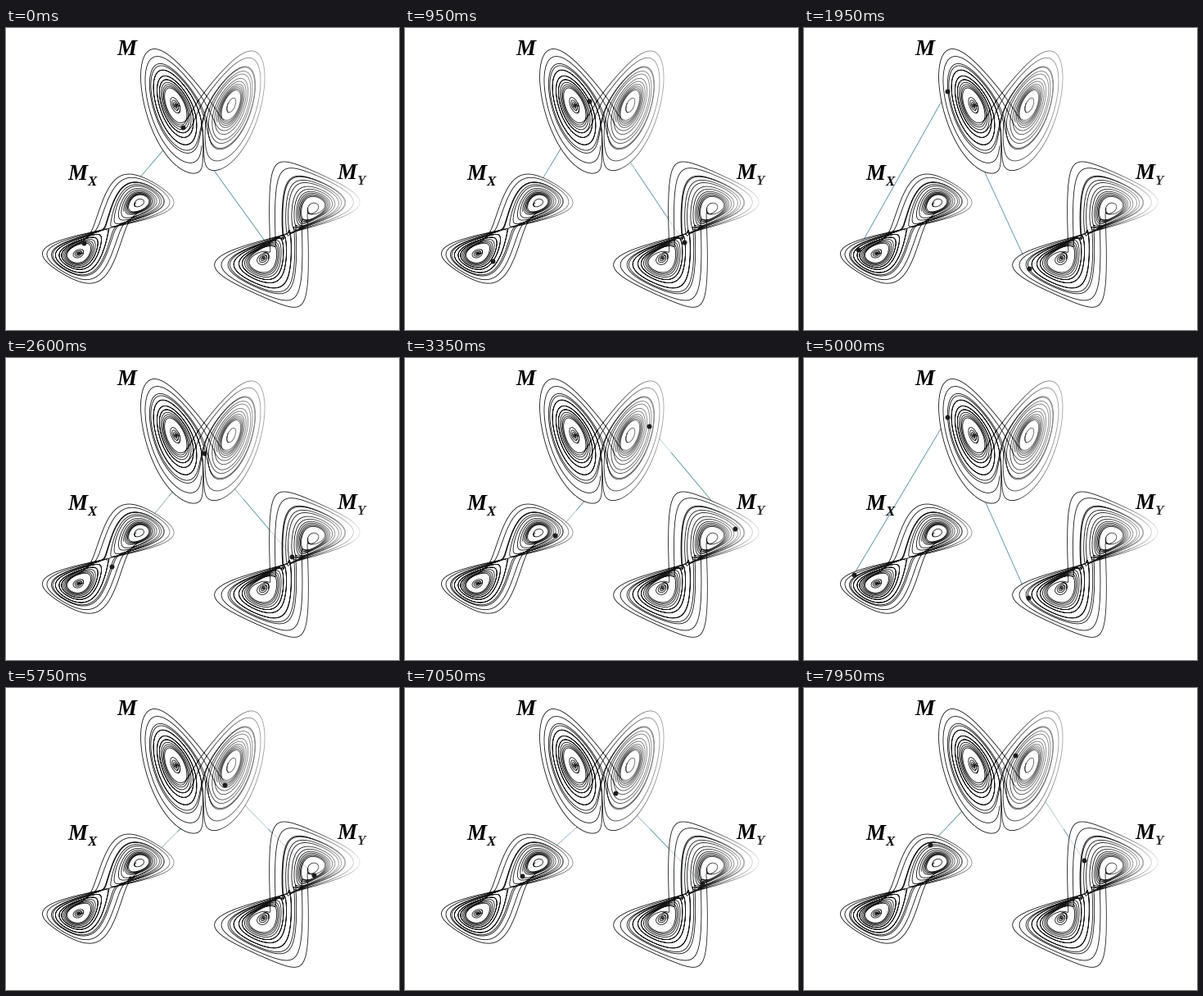
Animation, 480 px wide and 368 px high, one loop 8000 ms. Source, as a matplotlib script:

```python
import numpy as np
import matplotlib.pyplot as plt
from matplotlib.animation import FuncAnimation

W, H = 480, 368
FRAMES, STEP = 160, 50
DT, LAG = 0.0125, 10
C = np.sqrt(72)
PT = 0.72  # points per pixel at 100 dpi


def flow(s):
    x, y, z = s
    return np.stack([10 * (y - x), x * (28 - z) - y, x * y - z * 8 / 3])


def run(s, n):
    """Integrate the Lorenz system (RK4); result has shape (3, n, ...)."""
    out = []
    for _ in range(n):
        out.append(s)
        a = flow(s)
        b = flow(s + DT / 2 * a)
        c = flow(s + DT / 2 * b)
        d = flow(s + DT * c)
        s = s + DT / 6 * (a + 2 * b + 2 * c + d)
    return np.stack(out, 1)


def densify(s):
    """Insert Hermite midpoints to smooth the fast parts."""
    f = flow(s)
    out = np.empty((3, 2 * s.shape[1] - 1))
    out[:, ::2] = s
    out[:, 1::2] = (s[:, 1:] + s[:, :-1]) / 2 + DT / 8 * (f[:, :-1] - f[:, 1:])
    return out


def views(s, lag=LAG):
    """Pixel coordinates on M, M_X and M_Y: six rows."""
    x, y, z = s[:, lag:]
    px, py, _ = s[:, :-lag]
    return np.stack([
        241 + 4.05 * (x + 0.2 * (y - x)), 94 - 3.7 * (z - 27),
        125.5 + 4.4 * x, 244 - 3.65 * px,
        344.5 + 3.6 * y, 250.5 - 3.6 * py])


# an ensemble of orbits settled on the attractor
rng = np.random.default_rng(4)
seeds = rng.normal(0, 8, (3, 800))
seeds[2] += 25
orbits = run(run(seeds, 600)[:, -1], 1600)

# waypoints of the moving state: ms, then x, y on M, M_X, M_Y
KEYS = np.array([
    [0, 216, 121, 95, 262, 318, 262],
    [1950, 175, 77, 66, 270, 275, 293],
    [3350, 298, 83, 183, 216, 403, 208],
    [4300, 232, 140, 120, 244, 337, 255],
    [5750, 267, 118, 152, 232, 376, 228],
    [7050, 257, 128, 143, 229, 363, 238],
    [7950, 258, 82, 154, 191, 342, 210]])
key_frames = KEYS[:, 0] // STEP


def find_path():
    """Choose the orbit piece and speed that best follow the waypoints."""
    pos = views(orbits).astype(np.float32)
    starts = pos.shape[1] - 400
    best = (np.inf,)
    for rate in np.linspace(1.75, 2.35, 13):
        err = np.zeros((starts, pos.shape[2]), np.float32)
        for f, row in zip(key_frames, KEYS[:, 1:]):
            o = int(round(f * rate))
            for c in range(6):
                err += np.abs(pos[c, o:o + starts] - np.float32(row[c]))
        i, n = np.unravel_index(err.argmin(), err.shape)
        if err[i, n] < best[0]:
            best = (err[i, n], rate, i, n)
    _, rate, i, n = best
    t = i + np.arange(FRAMES) * rate
    grid = np.arange(pos.shape[1])
    path = np.array([np.interp(t, grid, p) for p in pos[:, :, n]])
    rest = KEYS[:, 1:].T - path[:, key_frames]
    return path + [np.interp(np.arange(FRAMES), key_frames, r) for r in rest]


def pick_orbit():
    """An orbit that fills both wings evenly."""
    x, y, z = orbits

    def hole(side):
        d = (x - side * C) ** 2 + (y - side * C) ** 2 + (z - 27) ** 2
        return np.sqrt(d.min(0))

    score = (abs(hole(-1) - 4) + abs(hole(1) - 4)
             + 8 * abs(np.sign(x).mean(0))
             + abs(y.max(0) - 24) + abs(y.min(0) + 24))
    return orbits[:, :, score.argmin()]


path = find_path()
main = views(densify(pick_orbit()), 2 * LAG)
parts = [main]
for side, size in [(-1, 0.4), (-1, 1), (-1, 1.8), (-1, 2.8), (1, 2.6)]:
    ring = run(np.array([side * C, side * C, 27 + size]), 75)
    parts += [np.full((6, 1), np.nan), views(densify(ring), 2 * LAG)]
curves = np.hstack(parts)

fig = plt.figure(figsize=(W / 100, H / 100), dpi=100, facecolor="white")
ax = fig.add_axes([0, 0, 1, 1])
ax.axis("off")

for k, cover in enumerate([1, 0.8, 0.65]):
    a, b = 2 * k, 2 * k + 1
    ax.fill(main[a], main[b], fc="white", ec="none", alpha=cover, zorder=2)
    ax.plot(curves[a], curves[b], color="#141414", lw=0.85 * PT, zorder=3)


def fade(x0, x1, y0, y1, strength):
    """White veil growing to the right."""
    veil = np.ones((1, 64, 4))
    veil[..., 3] = strength * np.linspace(0, 1, 64)
    ax.imshow(veil, extent=(x0, x1, y1, y0), aspect="auto", zorder=4)


fade(232, 325, 8, 172, 0.68)
fade(158, 209, 168, 252, 0.55)
fade(362, 434, 154, 346, 0.9)


def label(x, y, text, size, color="black"):
    ax.text(x, y, text, fontsize=size * PT, color=color, zorder=6,
            family="Liberation Serif", weight="bold", style="italic")


label(135, 33, "M", 27)
label(75, 185, "M", 27)
label(99, 192, "X", 17)
label(404, 184, "M", 27)
label(428, 191, "Y", 17, "#333333")

links = [ax.plot([], [], color="#5f97ad", lw=0.95 * PT, zorder=1)[0]
         for _ in range(2)]
dots, = ax.plot([], [], "o", color="#1c1c1c", ms=6 * PT, mew=0, zorder=5)
ax.set_xlim(0, W)
ax.set_ylim(H, 0)


def draw(i):
    p = path[:, i].reshape(3, 2)
    for link, end in zip(links, p[1:]):
        link.set_data([p[0, 0], end[0]], [p[0, 1], end[1]])
    dots.set_data(p[:, 0], p[:, 1])
    return [*links, dots]


anim = FuncAnimation(fig, draw, frames=FRAMES, interval=STEP, repeat=True,
                     repeat_delay=0, cache_frame_data=False)
plt.show()
```
